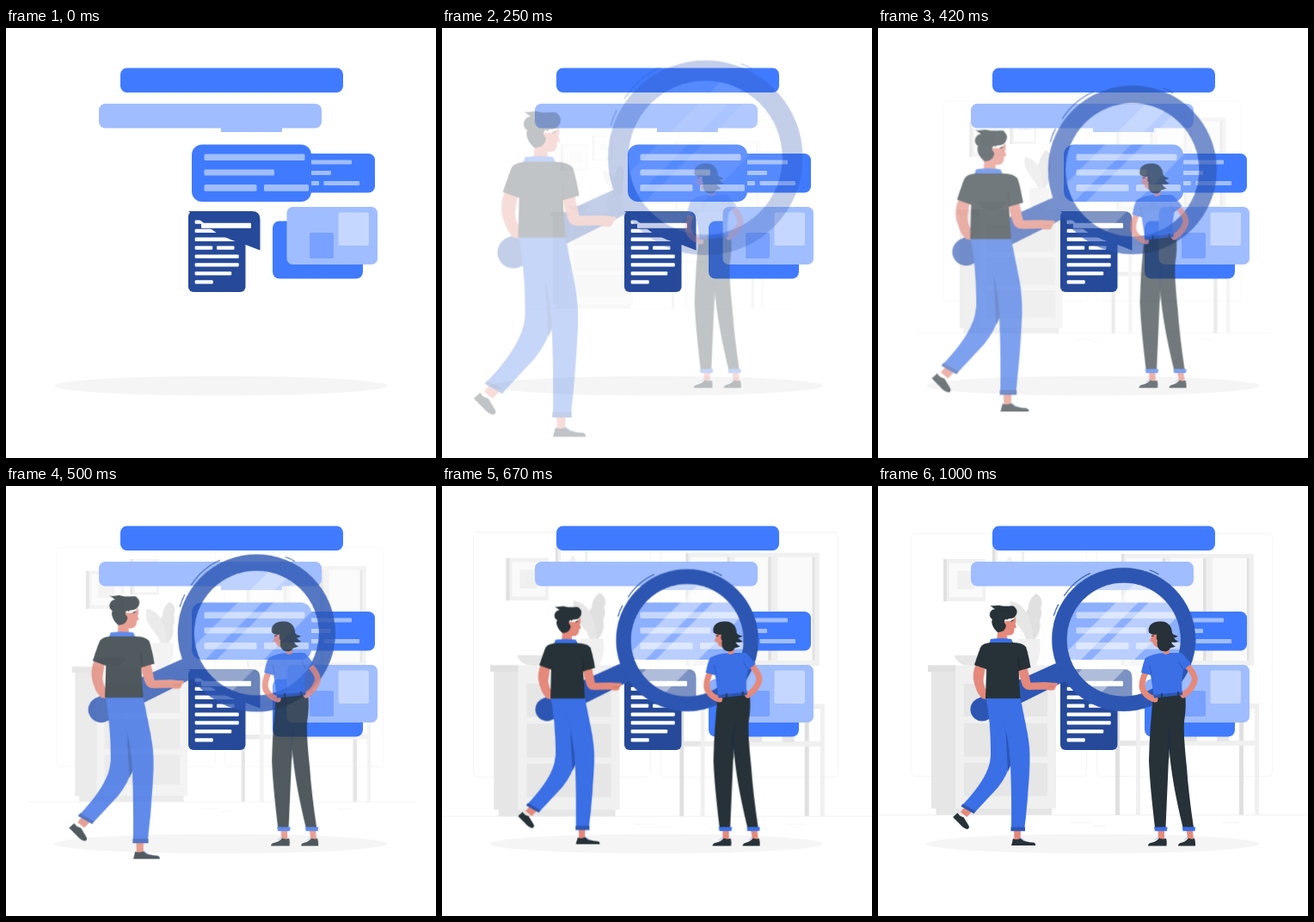
Recreate the animation shown at these times as an HTML page without scripts. Size 500 px wide and 500 px high, loop 1040 ms.

```html
<!DOCTYPE html>
<html lang="en">
<head>
<meta charset="utf-8">
<title>Searching documents</title>
<style>
html, body { margin: 0; width: 100%; height: 100%; overflow: hidden; background: #fff; }
svg { display: block; width: 100%; height: 100%; }

.room, .seeker, .woman { animation: 1040ms infinite; }
.room   { animation-name: grow;   transform-origin: 250px 224px; }
.seeker { animation-name: shrink; transform-origin: 228px 256.5px; }
.woman  { animation-name: slide; }

/* the move ends at 967 ms, then holds */
@keyframes grow {
  0% { opacity: 0; transform: scale(.5); animation-timing-function: cubic-bezier(.3475, .0728, .4991, 1.369); }
  92.98%, 100% { opacity: 1; transform: none; }
}
@keyframes shrink {
  0% { opacity: 0; transform: scale(1.5); animation-timing-function: cubic-bezier(.3475, .0728, .4991, 1.369); }
  92.98%, 100% { opacity: 1; transform: scale(1); }
}
@keyframes slide {
  0% { opacity: 0; transform: translateX(-30px); animation-timing-function: cubic-bezier(.3475, .0728, .4991, 1.369); }
  92.98%, 100% { opacity: 1; transform: translateX(0); }
}

.blue { fill: #407bff; }
.pale { fill: #a0bdff; }
.cloth { fill: #3a6fe6; }
.deep { fill: #2d56b3; }
.navy { fill: #264a99; }
.dark { fill: #263238; }
.skin { fill: #e4897b; }
.white { fill: #fff; }
.g1 { fill: #fafafa; }
.g2 { fill: #f0f0f0; }
.g3 { fill: #e6e6e6; }
.g4 { fill: #e0e0e0; }
.line { fill: none; stroke-linecap: round; }
</style>
</head>
<body>
<svg viewBox="0 0 500 500">
  <defs>
    <clipPath id="glass"><circle cx="285.7" cy="178.5" r="66.5"/></clipPath>
  </defs>

  <ellipse cx="249.5" cy="416" rx="193.5" ry="11.3" fill="#f5f5f5"/>

  <g class="room">
    <g fill="none" stroke="#f5f5f5">
      <rect x="38.5" y="55.5" width="204" height="282" rx="5"/>
      <rect x="254.500" y="55.5" width="204" height="282" rx="5"/>
    </g>
    <path d="M0 382.500H500" stroke="#ededed" stroke-width=".7"/>
    <path d="M224 391.500h24M250 395.500h15M400 391.500h19" stroke="#f2f2f2" stroke-width=".8"/>

    <!-- pictures -->
    <path class="g2" d="M76 85h49v49h-49z"/>
    <path class="g4" d="M76 85h4v49h-4z"/>
    <path class="g1" d="M83 89.500h38.500v40h-38.500z"/>
    <path class="g2" d="M92 98.500h20.500v21.500h-20.500z"/>
    <path class="g2" d="M133 70h37v46h-37z"/>
    <path class="g4" d="M133 70h3v46h-3z"/>
    <path class="white" d="M139 73.500h28v39h-28z"/>
    <path class="g2" d="M153 81l9 16h-18z"/>

    <!-- window -->
    <path class="g2" d="M283 79h154v130h-154z"/>
    <path class="g1" d="M289 84h41v119h-41zM340 84h38v119h-38zM389 84h41v119h-41z"/>
    <path class="g4" d="M283 79h3v130h-3zM331 84h3v119h-3zM378 84h3.500v119h-3.500zM429 84h2.500v119h-2.500z"/>

    <!-- plant and bowl -->
    <path class="g4" d="M184 125c7 4 8 12 5 17c2 5 1 10-1 14c2 10-1 18-8 24l-8-2c3-8-2-14 0-22c-2-6 0-10 3-14c0-8 4-13 9-17z"/>
    <path class="g3" d="M154 134c14 2 26 16 27 48h-8c-2-12-8-16-12-22c-6-8-9-16-7-26z"/>
    <path class="g2" d="M162 178h26c2 14-1 24-5 31h-17c-6-8-7-20-4-31z"/>
    <path class="g3" d="M89 197h38c-2 8-9 12-19 12s-17-4-19-12z"/>

    <!-- cabinet -->
    <path class="g2" d="M90 215h117v160h-117z"/>
    <path class="g3" d="M62 215h28v160h-28z"/>
    <path class="g2" d="M58 208.500h150v7.500h-150z"/>
    <path class="g4" d="M58 208.500h32v7.500h-32z"/>
    <path class="g3" d="M100 230h97v38h-97zM100 276h97v38.500h-97zM100 322h97v38.500h-97zM67.500 375h134.500v7.500h-134.500z"/>

    <!-- table -->
    <path class="g2" d="M300 259h5v123.500h-5zM438 253h5v129.500h-5zM276 253h167v6h-167z"/>
    <path class="g4" d="M276 259h5v123.500h-5zM420 259h5v123.500h-5z"/>
    <path class="g3" d="M276 296h24v6h-24z"/>
    <path class="g2" d="M300 296h138v6h-138z"/>
    <path class="g3" d="M357 289h14v8h-14zM394 289h14v8h-14z"/>
  </g>

  <g class="cards">
    <rect class="blue" x="133" y="46.500" width="259" height="28.500" rx="7.500"/>
    <rect class="pale" x="108" y="88" width="259" height="28.500" rx="7.500"/>
    <path class="pale" d="M250 111h71v10h-71z"/>

    <rect class="blue" x="335" y="146" width="94" height="45.500" rx="7.500"/>
    <g class="pale">
      <rect x="345" y="153.500" width="57" height="5" rx="1"/>
      <rect x="345" y="166" width="33" height="5" rx="1"/>
      <rect x="345" y="178" width="19" height="5" rx="1"/>
      <rect x="369.500" y="178" width="41.500" height="5" rx="1"/>
    </g>
    <rect class="blue" x="216" y="135.500" width="139" height="66.500" rx="12"/>
    <g class="pale">
      <rect x="230.500" y="146.500" width="117" height="7.500" rx="1.500"/>
      <rect x="230.500" y="164.500" width="81.500" height="7" rx="1.500"/>
      <rect x="230.500" y="182" width="61" height="7.700" rx="1.500"/>
      <rect x="300" y="182" width="52" height="7.700" rx="1.500"/>
    </g>

    <rect class="blue" x="310" y="224.500" width="105" height="67" rx="8"/>
    <rect class="pale" x="326.500" y="208" width="105.500" height="67" rx="7"/>
    <rect x="386.500" y="214.500" width="35.500" height="38.500" rx="2" fill="#c6d7ff"/>
    <rect x="353" y="238" width="28" height="30" rx="2" fill="#79a1ff"/>

    <rect class="navy" x="212" y="213" width="66.500" height="94" rx="6"/>
    <g class="white">
      <rect x="219.700" y="223.500" width="30" height="4.300" rx="1"/>
      <rect x="219.700" y="233.700" width="51" height="4.300" rx="1"/>
      <rect x="219.700" y="243.600" width="51" height="4.300" rx="1"/>
      <rect x="219.700" y="253.500" width="20.500" height="4.300" rx="1"/>
      <rect x="245" y="253.500" width="20.500" height="4.300" rx="1"/>
      <rect x="219.700" y="263.400" width="51" height="4.300" rx="1"/>
      <rect x="219.700" y="273.300" width="51" height="4.300" rx="1"/>
      <rect x="219.700" y="283.200" width="42.500" height="4.300" rx="1"/>
      <rect x="219.700" y="293.200" width="21" height="4.300" rx="1"/>
    </g>
    <path class="navy" d="M212 213h74q9.500 0 9.500 9.500v36l-17-6.500q-20-6-34-14q-9-6-18-14z"/>
    <rect class="white" x="227" y="226.700" width="58" height="6" rx="1"/>
  </g>

  <g class="seeker">
    <!-- magnifier -->
    <path class="deep" d="M115 247.500L207 206l12 20l-92 46a13.500 13.500 0 1 1-12-24.500z"/>
    <g clip-path="url(#glass)" fill="#fff" fill-opacity=".4">
      <path d="M215 110h142v142h-142z"/>
      <path d="M312 100h26L212 226v-26zM350 100h50L250 250h-50z"/>
    </g>
    <circle cx="285.700" cy="178.500" r="74.800" fill="none" stroke="#2d56b3" stroke-width="17.500"/>
    <path class="line" d="M216.500 127.500q12-18 30-26M204.500 150.500q2-7 5-12.500M316.500 98q5 1.500 9.500 4.500" stroke="#2d56b3" stroke-width="1.100"/>

    <!-- far arm -->
    <path class="skin" d="M114 207q-6 13-1 26q2 8 8 14l6 1v-9q-6-8-4-18l2-12z"/>

    <!-- legs -->
    <path class="skin" d="M101 373l8 6l-6 6l-7-6zM158 399h8l-.5 13h-7z"/>
    <path class="dark" d="M87 385l5.500-5q2 4 7 5l6 10q1 3-1.500 4q-5-1-9-6zM157 410q5 2 9-.5q5 5 15 5q2.500 1 2 3.500h-28z"/>
    <path class="line" d="M166 409.500l4 3" stroke="#a0bdff"/>
    <path class="cloth" d="M125.500 246h29l-.500 75q-3 15-15 30l-27 29l-14-9q19-20 27-36q7-13 6-29q0-30-5.500-60z"/>
    <path class="deep" d="M148 275l7 23v25l-4 9z"/>
    <path class="cloth" d="M134 246h31.500q4 20 8 40q3.500 18 3 36q-2 42-6 75h-15.500q.5-49-1.500-80q-2-22-6-38z"/>
    <path class="deep" d="M98.500 369.500l15 8.500l-2 3l-15-8.500zM154.500 396.500h16.500v4.800h-16.500z"/>

    <!-- head -->
    <path class="skin" d="M140 157h16l4-5q1 6-.5 8l1.500 4q-1 1.500-2.500 1.500q.500 9-8.500 8l1 9h-13z"/>
    <path class="dark" d="M139 170c-6-5-8-12-6-15c-5-3-4-11 3-12c-2-1-4-3-6-4c5 1 8-1 12 0c9 2 16-1 17 2c4 3 3 9-1 12c-3 2-7 0-8 3c-1-3-4 0-3 3l2 3c-1 7-6 8-10 8z"/>
    <path class="line" d="M155 157l2-1" stroke="#263238" stroke-width="1.200"/>

    <!-- shirt -->
    <path class="cloth" d="M131 178q12-2 24 0l3 6h-29z"/>
    <path class="skin" d="M163 212q2 12 5 20q2 5 9 5l18-.5q5 2 10 .5l2-4q3-3 1.500-4l-14-1l-17 .500l-4-18z"/>
    <path class="dark" d="M130 182h27q11 0 15 5q3 9 5.500 24l-14 4l2 32h-40.500l1-34l-14-5q5-15 7-20q2-5 11-6z"/>
    <path class="line" d="M164 214l-1-14" stroke="#1c262b"/>
    <path class="line" d="M198 233.500l7 0" stroke="#c97568" stroke-width=".6"/>
  </g>

  <g class="woman">
    <!-- legs -->
    <path class="skin" d="M325.500 400h7.500v12h-7zM358.500 400h7.500l1 12h-6.500z"/>
    <path class="dark" d="M327 409.500q5 2 8 0q1.500 5 .5 9h-21.500q0-3 3-3.500q6-1 10-5.500zM361 409.500q5 2 7 0q1.500 5 1 9h-20q0-3 3-3.500q5-1 9-5.500z"/>
    <path class="line" d="M326 408.500l-4 3M359.500 408.500l-3 3" stroke="#a0bdff"/>
    <path class="dark" d="M320 245l37-3q2 14-1 32q-1 16 3 53q2 30 8 70h-12.500q-13-53-16-92l-4 92h-12.500q-6-50-7-78q1-40 5-74z"/>
    <path d="M340.500 275q-4 15-3.500 30l1.500 14q-.5-23 2-44z" fill="#1c2c4d"/>
    <path class="cloth" d="M321 396.500h15.500l-.5 4.800h-14zM353.800 396.500h15.200l-.5 4.800h-14z"/>

    <!-- arms -->
    <path class="line" d="M312 215Q304 231 309 239Q314 246 322 248M358 207Q370 220 368 227Q365 237 355 243" stroke="#e4897b" stroke-width="7"/>
    <path class="skin" d="M317 243l8 1v7l-6-1z"/>

    <!-- shirt -->
    <path class="cloth" d="M333 194h20q6 6 11 13l-9 7q-3 14-1 28l-33 4l-4-26l-11-3q3-14 5-17q8-5 22-6z"/>
    <path class="line" d="M318 219l-2-10M355 213l-5-8" stroke="#2d56b3" stroke-width=".9"/>
    <path class="deep" d="M320.500 243l33.500-3.500v3.500l-33 3.500z"/>
    <path class="line" d="M330 241.500v4M349 239.500v4" stroke="#263238" stroke-width="1.500"/>

    <!-- head -->
    <path class="skin" d="M317.500 170h17l5 24q-4 3-8 1l.500-6q-11 0-13-8l-3-.5l2-5z"/>
    <path class="dark" d="M315 170c-2-8 5-13 13-12.500c8-1 14 5 14 13c1 3 4 3 7 4c-2 1-3 2-5 2c1 2 3 3 5 4c-3 2-5 1-8 1c1 3 3 4 5 5c-4 2-6 1-7 3c-2 4-7 3-10 2c-4-2-5-7-4-12c-2-2-1-4-1-7c-3 1-6 0-9-2z"/>
    <path class="line" d="M318.500 174.500l2-.5" stroke="#263238" stroke-width="1.200"/>
  </g>
</svg>
</body>
</html>
```
